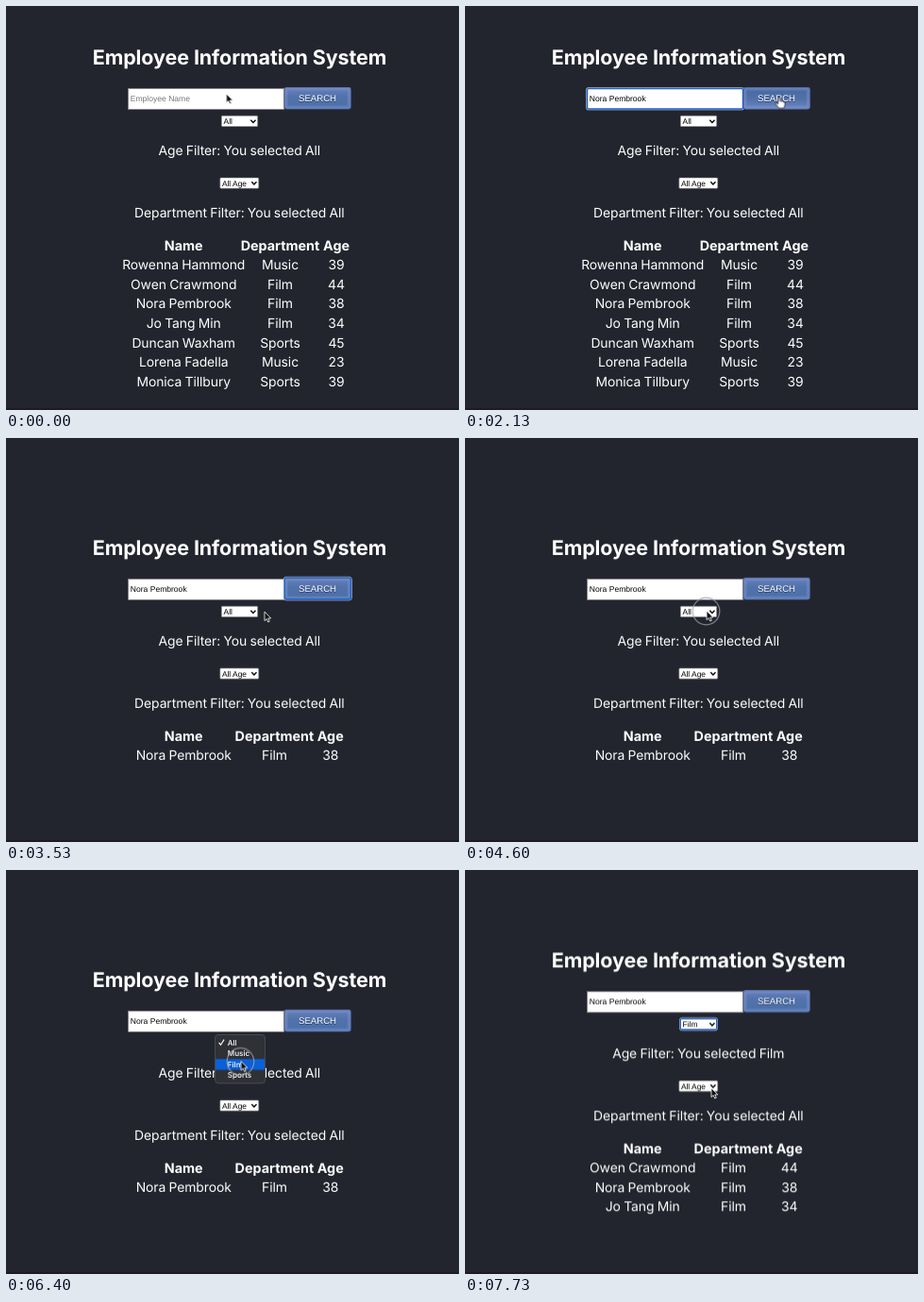
Recreate the animation shown at these times as an HTML page. Size 480 by 428 pixels, loop 8 s.

```html
<!DOCTYPE html>
<html lang="en">
<head>
<meta charset="utf-8">
<title>Employee Information System</title>
<style>
html, body { margin: 0; width: 100%; height: 100%; overflow: hidden; background: #23252e; }
svg { display: block; width: 100vw; height: 100vh; }
text { fill: #fff; text-rendering: geometricPrecision; font-optical-sizing: none; }
.mid { text-anchor: middle; }
.body { font: 13.95px Inter, Roboto, sans-serif; letter-spacing: -.1px; word-spacing: -.5px; }
.head { font: 700 14.35px Inter, Roboto, sans-serif; }
.title { font: 700 21.5px Inter, Roboto, sans-serif; letter-spacing: -.1px; }
.field { font: 8.55px "Liberation Sans", Arial, sans-serif; fill: #000; }
.hint { fill: #77757a; }
.pick { font: 8.4px "Liberation Sans", Arial, sans-serif; fill: #000; }
.label { font: 9.6px "Liberation Sans", Arial, sans-serif; }
.item { font: 500 8.1px Inter, Roboto, sans-serif; }
.box { fill: #fff; stroke: #85828a; stroke-width: 1; }
.select { fill: #fff; stroke: #6b6870; stroke-width: .6; }
.halo { fill: none; stroke: #e4ecfa; stroke-width: .7; }
.glow { fill: none; stroke: #1c62cf; stroke-width: 1.3; }
.bevel { fill: none; stroke: #8397d2; opacity: .35; }
.tick { fill: none; stroke: #000; stroke-width: 1.4; }

/* one shared 8 s clock; 1% = 80 ms */
.clock { animation: 8s linear infinite; }
.step { animation: 8s step-end infinite; }
#page { animation-name: page; }
.first { animation-name: first; }
.second { animation-name: second; }
.third { animation-name: third; }
.all { animation-name: all; }
.empty { animation-name: empty; }
.typed { animation-name: typed; }
.inFocus { animation-name: inFocus; }
.btnFocus { animation-name: btnFocus; }
.hover { animation-name: hover; }
#menu { animation-name: menu; }
#bar { animation-name: bar; }
#cursor { animation-name: cursor; }
#ring { animation-name: ring; }
.arrow { animation-name: arrow; }
.hand { animation-name: hand; }

@keyframes page {
  0% { transform: translateY(0); }
  31.625% { transform: translateY(61.9px); }
  82.5%, 100% { transform: translateY(41.3px); }
}
@keyframes first { 0% { opacity: 1; } 31.625%, 100% { opacity: 0; } }
@keyframes second { 0% { opacity: 0; } 31.625% { opacity: 1; } 82.5%, 100% { opacity: 0; } }
@keyframes third { 0% { opacity: 0; } 82.5%, 100% { opacity: 1; } }
@keyframes all { 0% { opacity: 1; } 82.5%, 100% { opacity: 0; } }
@keyframes empty { 0% { opacity: 1; } 20%, 100% { opacity: 0; } }
@keyframes typed { 0% { opacity: 0; } 20%, 100% { opacity: 1; } }
@keyframes inFocus { 0% { opacity: 0; } 14.2% { opacity: 1; } 30.875%, 100% { opacity: 0; } }
@keyframes btnFocus { 0% { opacity: 0; } 30.875% { opacity: 1; } 57.5%, 100% { opacity: 0; } }
@keyframes hover {
  0% { opacity: 0; } 5.8% { opacity: 1; } 13.9% { opacity: 0; }
  25.4% { opacity: 1; } 31.625%, 100% { opacity: 0; }
}
@keyframes menu { 0% { opacity: 0; } 58.3% { opacity: 1; } 82.5%, 100% { opacity: 0; } }
@keyframes bar {
  0% { transform: translateY(-11.5px); }
  62.5% { transform: translateY(0); }
  73.3%, 100% { transform: translateY(11.5px); }
}
@keyframes cursor {
  0%, 4.125% { transform: translate(233.5px, 93px); }
  6.625%, 13.375% { transform: translate(332px, 97px); }
  15%, 22.5% { transform: translate(240px, 97px); }
  26.6%, 32.5% { transform: translate(331.7px, 96.5px); }
  35%, 37.4% { transform: translate(312px, 162px); }
  37.5%, 42.5% { transform: translate(262px, 172px); }
  44.1% { transform: translate(274px, 184px); }
  50%, 57.5% { transform: translate(256px, 183px); }
  65%, 68.375% { transform: translate(258px, 191px); }
  75%, 92.5% { transform: translate(249px, 202.5px); }
  96.6%, 100% { transform: translate(261px, 231px); }
}
@keyframes ring {
  0%, 29.95% { opacity: 0; } 30% { opacity: .8; } 32.5%, 57.45% { opacity: 0; }
  57.5% { opacity: .8; } 60%, 79.95% { opacity: 0; }
  80% { opacity: .8; } 82.5%, 100% { opacity: 0; }
}
@keyframes arrow {
  0% { opacity: 1; } 5.8% { opacity: 0; } 13.9% { opacity: 1; }
  25.4% { opacity: 0; } 31.625%, 100% { opacity: 1; }
}
@keyframes hand {
  0% { opacity: 0; } 5.8% { opacity: 1; } 13.9% { opacity: 0; }
  25.4% { opacity: 1; } 31.625%, 100% { opacity: 0; }
}
</style>
</head>
<body>
<svg viewBox="0 0 480 428">
  <defs>
    <linearGradient id="blue" x2="0" y2="1">
      <stop offset="0" stop-color="#6680ba"/>
      <stop offset=".45" stop-color="#5272ab"/>
      <stop offset="1" stop-color="#4b70a8"/>
    </linearGradient>
    <linearGradient id="deep" x2="0" y2="1">
      <stop offset="0" stop-color="#47699f"/>
      <stop offset=".5" stop-color="#5070a8"/>
      <stop offset="1" stop-color="#6a84be"/>
    </linearGradient>
  </defs>
  <rect width="480" height="428" fill="#23252e"/>
  <rect y="426" width="480" height="2" fill="#1d1a23"/>

  <g id="page" class="step">
    <text class="title mid" x="247.5" y="62.3">Employee Information System</text>

    <rect class="box" x="129.5" y="87.5" width="165" height="22"/>
    <text class="field hint step empty" x="131.8" y="101.2">Employee Name</text>
    <text class="field step typed" x="131.8" y="101.2">Nora Pembrook</text>
    <g class="step inFocus">
      <rect class="halo" x="128.7" y="86.7" width="166.6" height="23.2" rx="1.5"/>
      <rect class="glow" x="129.6" y="87.6" width="164.8" height="21.4" rx="1"/>
    </g>

    <rect x="295" y="86" width="70.5" height="23.3" rx="2" fill="url(#blue)"/>
    <rect class="step hover" x="295" y="86" width="70.5" height="23.3" rx="2" fill="url(#deep)"/>
    <rect class="bevel" x="297" y="88" width="66.5" height="19.3" rx="2" stroke-width="3.4"/>
    <rect class="bevel" x="296.1" y="87.1" width="68.3" height="21.1" rx="2" stroke-width="1.5"/>
    <rect x="295.3" y="86.3" width="69.9" height="22.7" rx="2" fill="none" stroke="#4a5f98" stroke-width=".6"/>
    <text class="label mid" x="330" y="101.9" style="fill:#283966">SEARCH</text>
    <text class="label mid" x="330" y="101.1">SEARCH</text>
    <g class="step btnFocus">
      <rect class="halo" x="294.3" y="85.3" width="72" height="24.6" rx="2.5"/>
      <rect class="glow" x="295.2" y="86.2" width="70.2" height="22.8" rx="2"/>
    </g>

    <rect class="select" x="228.3" y="116.3" width="38.4" height="11.4" rx="1"/>
    <text class="pick step all" x="230.6" y="125">All</text>
    <text class="pick step third" x="230.6" y="125">Film</text>
    <path class="tick" d="M259.3 120.8l2.6 2.6l2.6-2.6"/>
    <g class="step third">
      <rect class="halo" x="227.4" y="115.3" width="40.2" height="13.4" rx="2.5"/>
      <rect class="glow" x="228.3" y="116.2" width="38.4" height="11.6" rx="1.5"/>
    </g>
    <text class="body mid step all" x="247.3" y="157.6">Age Filter: You selected All</text>
    <text class="body mid step third" x="247.3" y="157.6">Age Filter: You selected Film</text>

    <rect class="select" x="226.8" y="181.9" width="41" height="11.4" rx="1"/>
    <text class="pick" x="228.9" y="190.5">All Age</text>
    <path class="tick" d="M260.3 186.3l2.6 2.6l2.6-2.6"/>
    <text class="body mid" x="247.3" y="223.8">Department Filter: You selected All</text>
  </g>

  <g id="menu" class="step">
    <rect x="221.5" y="174.5" width="53" height="51.5" rx="3.5" fill="#303136" stroke="#515258" stroke-width=".8"/>
    <rect id="bar" class="step" x="222" y="188.6" width="52" height="11.5" fill="#0a60d8"/>
    <path d="M225.6 182.8l1.9 2.4l3.6-5.6" fill="none" stroke="#fff" stroke-width="1.1"/>
    <text class="item" x="234.8" y="185.5">All</text>
    <text class="item" x="234.8" y="197">Music</text>
    <text class="item" x="234.8" y="208.5">Film</text>
    <text class="item" x="234.8" y="220">Sports</text>
  </g>

  <g id="cursor" class="clock">
    <circle id="ring" class="clock" r="14.3" cx="-.5" cy=".5" fill="none" stroke="#a3a5aa" stroke-width="1.2"/>
    <path class="step arrow" d="M0 0V9.6L2.2 7.6L3.7 11L5.3 10.3L3.8 7H6.8Z" fill="#111" stroke="#fff" stroke-width=".8"/>
    <path class="step hand" d="M0 .8Q1-.5 2 .8V4.2Q3.2 3.6 3.8 4.5Q5 4 5.5 5Q7 4.6 7.2 6V8.5Q7 10 6 11.8H.8Q-.2 10-2.6 7.4Q-2.6 5.8-1.2 6.4L0 7.4Z"
      fill="#fff" stroke="#1c1c20" stroke-width=".8"/>
  </g>
</svg>
<script>
const staff = [
  ["Rowenna Hammond", "Music", 39],
  ["Owen Crawmond", "Film", 44],
  ["Nora Pembrook", "Film", 38],
  ["Jo Tang Min", "Film", 34],
  ["Duncan Waxham", "Sports", 45],
  ["Lorena Fadella", "Music", 23],
  ["Monica Tillbury", "Sports", 39]
];
const page = document.getElementById("page");

function add(parent, tag, attrs, content = "") {
  const node = document.createElementNS("http://www.w3.org/2000/svg", tag);
  for (const key in attrs) node.setAttribute(key, attrs[key]);
  node.textContent = content;
  return parent.appendChild(node);
}

function table(phase, people, columns) {
  const group = add(page, "g", { class: "step " + phase });
  [["Name", "Department", "Age"], ...people].forEach((cells, row) =>
    cells.forEach((cell, i) => add(group, "text", {
      class: (row ? "body" : "head") + " mid",
      x: columns[i],
      y: 258.5 + row * 20.63
    }, cell)));
}

table("first", staff, [188.2, 290.5, 350]);
table("second", staff.slice(2, 3), [188.2, 284.4, 343.7]);
table("third", staff.filter(person => person[1] === "Film"), [188.2, 284.4, 343.7]);
</script>
</body>
</html>
```
